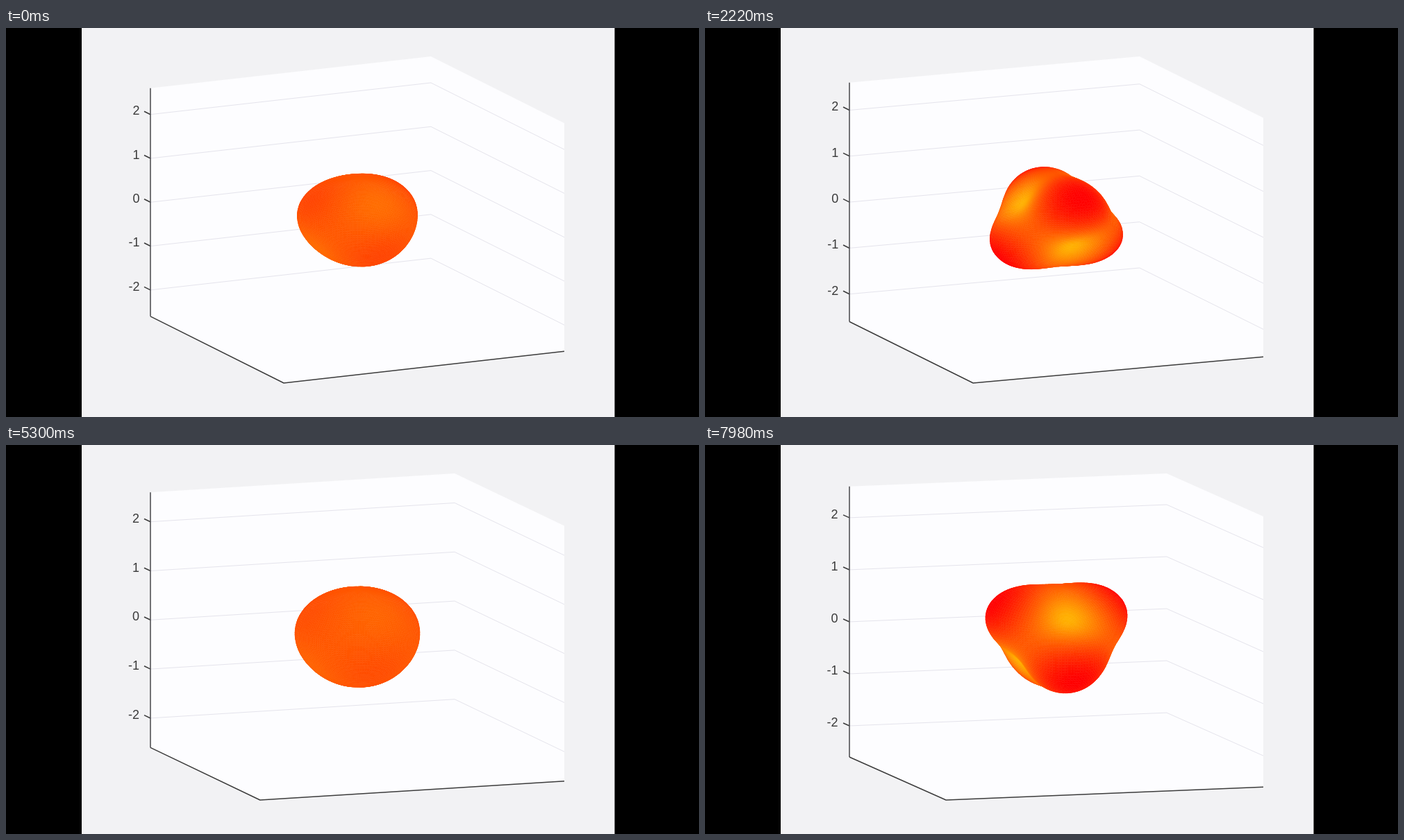
These frames come from a looping animation (998x561 px, 8 s). An HTML page with a canvas:

```html
<!DOCTYPE html>
<html lang="en">
<head>
<meta charset="utf-8">
<title>Oscillating harmonic surface</title>
<style>
  html, body { margin: 0; width: 100%; height: 100%; overflow: hidden; background: #000; }
  canvas { display: block; }
</style>
</head>
<body>
<canvas id="stage" width="998" height="561"></canvas>
<script>
const ctx = document.getElementById('stage').getContext('2d');
const LOOP = 8000;
const LIMIT = 2.6;
const BOX = { left: 208, right: 804, top: 41, bottom: 512 };
const ROWS = 72, COLS = 144;
const RAD = Math.PI / 180;

// Steps come in threes, held for 100, 20 and 20 ms.
function stepAt(ms) {
  const u = ms - 20;
  if (u < 0) return 0;
  const rest = u % 140;
  return 1 + 3 * Math.floor(u / 140) + (rest >= 100) + (rest >= 120);
}

// Orthographic view, stretched so the axes box always fills BOX.
function makeView(step) {
  const turn = (25.43 - 0.0497 * step) * RAD;
  const tilt = turn - 7.5 * RAD;
  const c = Math.cos(turn), s = Math.sin(turn);
  const ce = Math.cos(tilt), se = Math.sin(tilt);
  const sx = (BOX.right - BOX.left) / (2 * LIMIT * (c + s));
  const sy = (BOX.bottom - BOX.top) / (2 * LIMIT * (ce + se * (c + s)));
  const cx = (BOX.left + BOX.right) / 2, cy = (BOX.top + BOX.bottom) / 2;
  return (x, y, z) => {
    const away = s * x + c * y;
    return {
      x: cx + sx * (c * x - s * y),
      y: cy - sy * (se * away + ce * z),
      depth: se * z - ce * away
    };
  };
}

function trace(points, close) {
  ctx.beginPath();
  for (const p of points) ctx.lineTo(p.x, p.y);
  if (close) ctx.closePath();
}

function line(points, color, width) {
  trace(points, false);
  ctx.strokeStyle = color;
  ctx.lineWidth = width;
  ctx.stroke();
}

function drawAxes(view, step) {
  const L = LIMIT;
  const left = z => view(-L, L, z), back = z => view(L, L, z);
  const right = z => view(L, -L, z), front = z => view(-L, -L, z);

  trace([left(L), back(L), right(L), right(-L), front(-L), left(-L)], true);
  ctx.fillStyle = '#fdfdff';
  ctx.fill();

  const low = left(-L), near = front(-L);
  const slope = (near.y - low.y) / (near.x - low.x);
  ctx.font = '18px "Liberation Sans", Arial, sans-serif';
  ctx.textAlign = 'right';
  for (let z = -2; z <= 2; z++) {
    const p = left(z);
    line([p, back(z), right(z)], '#e5e4ec', 1);
    line([p, { x: p.x - 9, y: p.y - 9 * slope }], '#3c3c3c', 1.6);
    ctx.fillStyle = '#3a3a3a';
    ctx.fillText(z, 192.6 - step / 171, p.y - 11 * slope + 6.3);
  }
  line([left(L), low], '#505054', 1.6);
  line([low, near, right(-L)], '#3c3c3c', 1.5);
}

function drawSurface(view, step) {
  const amp = -0.272 * Math.cos(0.0308 * (step - 58)) / 0.3849;
  const grid = [];
  for (let i = 0; i <= ROWS; i++) {
    const theta = Math.PI * i / ROWS;
    const st = Math.sin(theta), ct = Math.cos(theta);
    const row = [];
    for (let j = 0; j <= COLS; j++) {
      const phi = 2 * Math.PI * j / COLS;
      const r = 1 + amp * st * st * ct * Math.cos(2 * phi);
      const p = view(r * st * Math.cos(phi), r * st * Math.sin(phi), r * ct);
      p.r = r;
      row.push(p);
    }
    grid.push(row);
  }

  const faces = [];
  for (let i = 0; i < ROWS; i++) {
    for (let j = 0; j < COLS; j++) {
      const a = grid[i][j], b = grid[i][j + 1];
      const c = grid[i + 1][j + 1], d = grid[i + 1][j];
      const facing = (c.x - a.x) * (d.y - b.y) - (c.y - a.y) * (d.x - b.x);
      if (facing <= 0) continue;
      faces.push({
        points: [a, b, c, d],
        depth: a.depth + b.depth + c.depth + d.depth,
        r: (a.r + b.r + c.r + d.r) / 4
      });
    }
  }
  faces.sort((p, q) => p.depth - q.depth);

  ctx.lineWidth = 0.6;
  for (const face of faces) {
    const green = Math.max(0, Math.round(88 - 345 * (face.r - 1)));
    ctx.fillStyle = ctx.strokeStyle = `rgb(255,${green},0)`;
    trace(face.points, true);
    ctx.fill();
    ctx.stroke();
  }
}

function draw(step) {
  ctx.fillStyle = '#000';
  ctx.fillRect(0, 0, 998, 561);
  ctx.fillStyle = '#f2f2f4';
  ctx.fillRect(109, 0, 767.5, 561);
  const view = makeView(step);
  drawAxes(view, step);
  drawSurface(view, step);
}

ctx.lineJoin = 'round';
const start = performance.now();
let shown = -1;
function tick() {
  const step = stepAt((performance.now() - start) % LOOP);
  if (step !== shown) draw(shown = step);
  requestAnimationFrame(tick);
}
tick();
</script>
</body>
</html>
```
